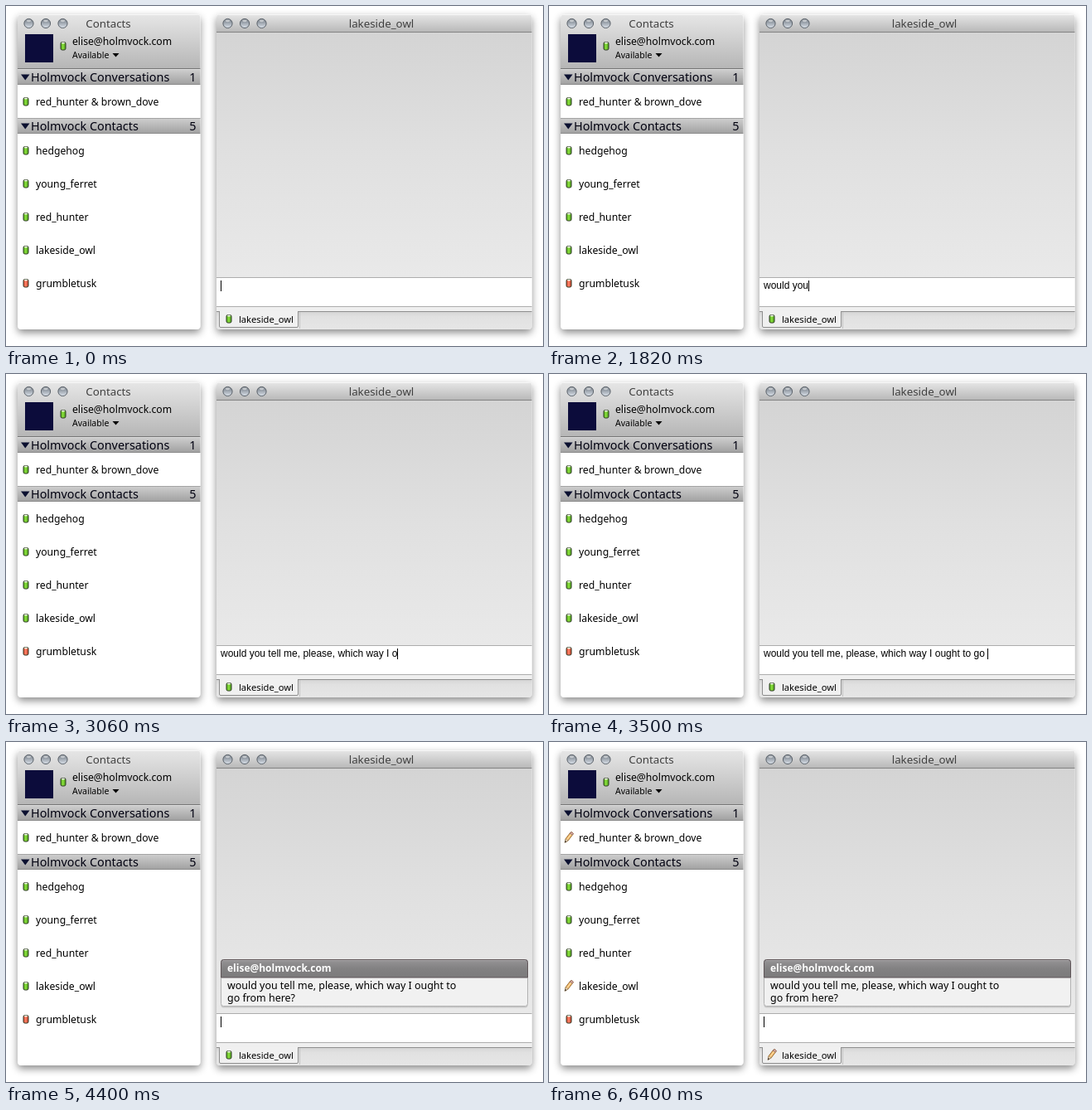
An HTML page for the animation above (8000 ms loop, 648 by 410 pixels).

```html
<!DOCTYPE html>
<html lang="en">
<head>
<meta charset="utf-8">
<title>Contacts</title>
<style>
html, body { margin: 0; width: 100%; height: 100%; overflow: hidden; background: #fff; }
svg { display: block; width: 100%; height: 100%; }
text { font: 12.2px "Noto Sans", "Open Sans", sans-serif; fill: #000; white-space: pre; }
.title { font-size: 13.3px; fill: #404040; text-anchor: middle; }
.head { font-size: 14.4px; fill: #000010; }
.small { font-size: 10.5px; }
.tab { font-size: 11.15px; }
.from { font-size: 12px; font-weight: 700; fill: #fff; }
.body { font-size: 12.45px; }
.typed { font: 12px "Liberation Sans", Arial, sans-serif; }
</style>
</head>
<body>
<svg viewBox="0 0 648 410" xmlns="http://www.w3.org/2000/svg">
  <defs>
    <linearGradient id="bar" x2="0" y2="1"><stop stop-color="#e6e6e6"/><stop offset="1" stop-color="#b9b9b9"/></linearGradient>
    <linearGradient id="tall" x2="0" y2="1"><stop stop-color="#e6e6e6"/><stop offset="1" stop-color="#b6b6b6"/></linearGradient>
    <linearGradient id="group" x2="0" y2="1"><stop stop-color="#cfcfcf"/><stop offset="1" stop-color="#a2a2a2"/></linearGradient>
    <linearGradient id="chat" x2="0" y2="1"><stop stop-color="#d4d4d4"/><stop offset=".5" stop-color="#e0e0e0"/><stop offset="1" stop-color="#e9e9e9"/></linearGradient>
    <linearGradient id="strip" x2="0" y2="1"><stop stop-color="#d4d4d4"/><stop offset=".3" stop-color="#e1e1e1"/><stop offset="1" stop-color="#e6e6e6"/></linearGradient>
    <linearGradient id="msg" x2="0" y2="1"><stop stop-color="#969496"/><stop offset=".5" stop-color="#828182"/><stop offset="1" stop-color="#7b7a7b"/></linearGradient>
    <linearGradient id="light" x2="0" y2="1"><stop stop-color="#727982"/><stop offset=".45" stop-color="#9fa7b0"/><stop offset="1" stop-color="#dbe2ea"/></linearGradient>
    <linearGradient id="green"><stop stop-color="#4fa51c"/><stop offset=".45" stop-color="#8be03c"/><stop offset="1" stop-color="#4a9c1a"/></linearGradient>
    <linearGradient id="red"><stop stop-color="#d2432c"/><stop offset=".45" stop-color="#ff8468"/><stop offset="1" stop-color="#c83c28"/></linearGradient>
    <filter id="shadow" x="-10%" y="-10%" width="120%" height="120%">
      <feDropShadow dx="0" dy="4" stdDeviation="4.8" flood-color="#000" flood-opacity=".45"/>
    </filter>
    <clipPath id="left"><rect x="14" y="10" width="220.5" height="380" rx="4.5"/></clipPath>
    <clipPath id="right"><rect x="254" y="10" width="380.5" height="380" rx="4.5"/></clipPath>

    <g id="lights" fill="url(#light)" stroke="#5c636b">
      <circle r="5.6"/><circle cx="20.5" r="5.6"/><circle cx="41" r="5.6"/>
      <g fill="#fff" fill-opacity=".5" stroke="none">
        <ellipse cy="-3.2" rx="2.8" ry="1.4"/><ellipse cx="20.5" cy="-3.2" rx="2.8" ry="1.4"/><ellipse cx="41" cy="-3.2" rx="2.8" ry="1.4"/>
      </g>
    </g>
    <g id="cell">
      <rect x="-3" y="-4.5" width="6" height="9.5" rx="1.8" stroke="#2f3a26"/>
      <ellipse cy="-3.5" rx="2" ry="1" fill="#eef3e8"/>
    </g>
    <g id="pencil" stroke-linejoin="round">
      <path d="M-4.8 6.2L-4 1.8L1.9 -6Q4 -7.4 5.4 -4.4L-.8 3.8Z" fill="#f3b766" stroke="#91662f" stroke-width=".9"/>
      <path d="M-2.4 2.8L3.6 -5.2" stroke="#ffdca2" stroke-width="1.2"/>
      <path d="M1 -4.8L1.9 -6Q4 -7.4 5.4 -4.4L4.4 -3Z" fill="#d9a9a0" stroke="#8d6a62" stroke-width=".7"/>
      <path d="M-4.8 6.2L-4 1.8L-.8 3.8Z" fill="#f4e2c4" stroke="#8d7656" stroke-width=".6"/>
      <path d="M-4.9 6.4L-4.5 4L-2.8 5Z" fill="#2c2622"/>
    </g>
  </defs>
  <rect width="648" height="410" fill="#fff"/>

  <rect x="14" y="10" width="220.5" height="380" rx="4.5" fill="#fff" filter="url(#shadow)"/>
  <g clip-path="url(#left)">
    <rect x="14" y="10" width="221" height="65" fill="url(#tall)"/>
    <path d="M14 10.5H235" stroke="#f6f6f6"/>
    <path d="M14 75.5H235" stroke="#767676"/>
    <g id="groups"></g>
  </g>
  <use href="#lights" x="27.5" y="21"/>
  <text class="title" x="123.5" y="25.5">Contacts</text>
  <rect x="23" y="34" width="34" height="34" fill="#0c0c3b"/>
  <text x="80" y="47">elise@holmvock.com</text>
  <text class="small" x="80" y="63">Available</text>
  <path d="M128.5 57H136.5L132.5 61.5Z"/>
  <g id="list"></g>

  <rect x="254" y="10" width="380.5" height="380" rx="4.5" fill="#e9e9e9" filter="url(#shadow)"/>
  <g clip-path="url(#right)">
    <rect x="254" y="10" width="381" height="21" fill="url(#bar)"/>
    <path d="M254 10.5H635" stroke="#f6f6f6"/>
    <rect x="254" y="32" width="381" height="295" fill="url(#chat)"/>
    <path d="M254 31.5H635" stroke="#838383"/>
    <rect x="254" y="328" width="381" height="34" fill="#fff"/>
    <path d="M254 327.5H635M254 362.5H635" stroke="#adadad"/>
    <rect x="254" y="363" width="381" height="5" fill="#efefef"/>
    <rect x="254" y="368" width="381" height="22" fill="url(#strip)"/>
    <path d="M254 368.5H635" stroke="#8e8e8e"/>
    <path d="M257.5 368V386Q257.5 387.5 259 387.5H351Q352.5 387.5 352.5 386V368" fill="#f0f0f0" stroke="#8e8e8e"/>
    <path d="M258 368.5H352" stroke="#f0f0f0"/>
    <path d="M354.5 369V389" stroke="#c2c2c2"/>
  </g>
  <use href="#lights" x="267.5" y="21"/>
  <text class="title" x="453" y="25.5">lakeside_owl</text>
  <text class="tab" x="281" y="382">lakeside_owl</text>

  <g id="message">
    <rect x="259.5" y="263.5" width="370" height="57" rx="3" fill="#000" opacity=".14"/>
    <rect x="259.5" y="262.5" width="370" height="56" rx="3" fill="#f1f1f1" stroke="#b2b2b2"/>
    <path d="M259.5 284V265.5Q259.5 262.5 262.5 262.5H626.5Q629.5 262.5 629.5 265.5V284Z" fill="url(#msg)" stroke="#5f5558"/>
    <path d="M262 263.5H627" stroke="#aaa8aa"/>
    <text class="from" x="267" y="277">elise@holmvock.com</text>
    <text class="body" x="267" y="298">would you tell me, please, which way I ought to</text>
    <text class="body" x="267" y="313">go from here?</text>
  </g>
  <text id="typed" class="typed" x="259" y="341"></text>
  <rect id="caret" y="331" width="1" height="13"/>
  <g id="icons"></g>
</svg>
<script>
const LOOP = 8000, TYPE_AT = 1500, KEY = 40, SEND_AT = 4400, REPLY_AT = 4900, JOIN_AT = 6400;
const LINE = "would you tell me, please, which way I ought to go from here?";
const $ = id => document.getElementById(id);

const groupBar = (y, name, count) => `
  <rect x="14" y="${y}" width="221" height="18" fill="url(#group)"/>
  <path d="M14 ${y + .5}H235" stroke="#dadada"/>
  <path d="M14 ${y + 18.5}H235" stroke="#8b8b8b"/>
  <path d="M18 ${y + 6.5}H28.5L23.25 ${y + 13.5}Z" fill="#0b1030"/>
  <text class="head" x="30" y="${y + 15}">${name}</text>
  <text class="head" x="229.5" y="${y + 15}" text-anchor="end">${count}</text>`;

$("groups").innerHTML = groupBar(76, "Holmvock Conversations", 1) +
  groupBar(135, "Holmvock Contacts", 5) + `<path d="M14 135.5H235" stroke="#a4a4a4"/>`;

const people = ["hedgehog", "young_ferret", "red_hunter", "lakeside_owl", "grumbletusk"];
const row = (name, y) => `<text x="36" y="${y}">${name}</text>`;
$("list").innerHTML = row("red_hunter &amp; brown_dove", 120) +
  people.map((name, i) => row(name, 179 + 40 * i)).join("");

// Status icons; those with a start time turn into pencils.
const icons = [
  { x: 69, y: 48 },
  { x: 24, y: 115, writes: JOIN_AT },
  { x: 24, y: 174 },
  { x: 24, y: 214 },
  { x: 24, y: 254 },
  { x: 24, y: 294, writes: REPLY_AT },
  { x: 24, y: 334, color: "red" },
  { x: 269, y: 377, writes: REPLY_AT }
];
for (const icon of icons) {
  icon.el = document.createElementNS("http://www.w3.org/2000/svg", "use");
  icon.el.setAttribute("transform", `translate(${icon.x} ${icon.y})`);
  icon.el.setAttribute("fill", `url(#${icon.color || "green"})`);
  $("icons").append(icon.el);
}

function draw(t) {
  const sent = t >= SEND_AT;
  const keys = Math.max(0, Math.floor((t - TYPE_AT) / KEY) + 1);
  const typed = $("typed");
  typed.textContent = sent ? "" : LINE.slice(0, keys);
  const width = typed.textContent ? typed.getComputedTextLength() : 0;
  $("caret").setAttribute("x", Math.round(259 + width));
  $("message").setAttribute("visibility", sent ? "visible" : "hidden");
  for (const { el, writes } of icons)
    el.setAttribute("href", t >= writes ? "#pencil" : "#cell");
}

const start = performance.now();
function tick() {
  draw((performance.now() - start) % LOOP);
  requestAnimationFrame(tick);
}
tick();
</script>
</body>
</html>
```
